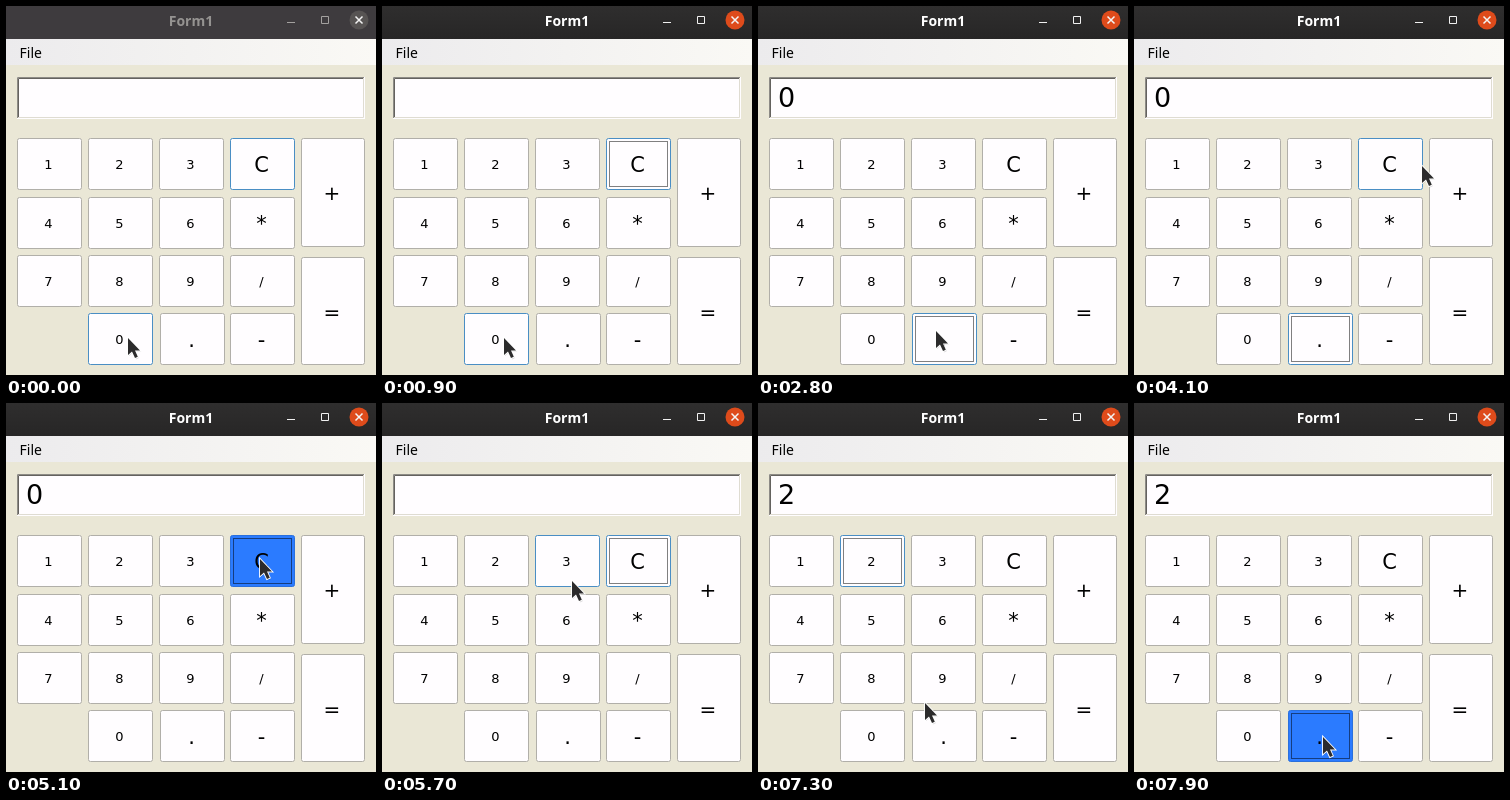
Animation of 370 by 369 pixels, one loop 8000 ms. Source, as an HTML page:

```html
<!DOCTYPE html>
<html lang="en">
<head>
<meta charset="utf-8">
<title>Calculator</title>
<style>
  html, body { margin: 0; width: 100%; height: 100%; overflow: hidden; background: #eae7d6; }
  svg { display: block; width: 370px; height: 369px; }
  text { font-family: "DejaVu Sans", sans-serif; fill: #000; }
  .ui { font: 14px "Noto Sans", sans-serif; }
  .bar { fill: #3e3b3e; }
  .title { font-weight: 700; fill: #959391; text-anchor: middle; }
  .icon { fill: none; stroke: #a3a19f; }
  .close { fill: #575453; }
  .cross { stroke: #f4f4f4; stroke-width: 1.5; }
  .active .bar { fill: url(#dark); }
  .active .title { fill: #fff; }
  .active .icon { stroke: #f0f0f0; }
  .active .close { fill: #de4b1b; }
  .key text { text-anchor: middle; }
  .face { fill: #fffdff; stroke: #b1afa9; }
  .dots { fill: none; stroke: #000; stroke-dasharray: 1 1; visibility: hidden; }
  .focus .face, .hover .face { stroke: #4a8ec4; }
  .press .face { fill: #2b7bff; stroke: #2a70dc; }
  .active .focus .dots { visibility: visible; }
</style>
</head>
<body>
<svg id="stage" viewBox="0 0 370 369">
  <defs>
    <linearGradient id="dark" x2="0" y2="1">
      <stop stop-color="#2f2e2e"/><stop offset="1" stop-color="#272626"/>
    </linearGradient>
    <linearGradient id="menu">
      <stop stop-color="#ecebed"/><stop offset="1" stop-color="#faf9f5"/>
    </linearGradient>
  </defs>
  <rect width="370" height="369" fill="#eae7d6"/>

  <rect class="bar" width="370" height="33"/>
  <text class="ui title" x="185" y="20">Form1</text>
  <path class="icon" d="M281 16.5h8M315.500 10.500h7v7h-7z"/>
  <circle class="close" cx="353" cy="14" r="9.500"/>
  <path class="cross" d="M349.500 10.500l7 7m0-7l-7 7"/>

  <rect y="33" width="370" height="26" fill="url(#menu)"/>
  <text class="ui" x="13.500" y="52">File</text>

  <rect x="11" y="71" width="348" height="42" fill="#fffdff"/>
  <path d="M11.500 112V71.500H358" fill="none" stroke="#8d8b86"/>
  <path d="M12.500 111V72.500H357" fill="none" stroke="#64625f"/>
  <path d="M12 111.500H357.500V72" fill="none" stroke="#dfdcd2"/>
  <text id="display" x="20" y="101" font-size="27"></text>

  <g id="keys"></g>
  <g id="cursor">
    <path d="M0 0V17L4 13.500 7 20.500 10 19 7.200 12.700H12.500Z" transform="translate(1 1)" fill="#000" opacity=".15"/>
    <path d="M0 0V17L4 13.500 7 20 9.800 18.700 7 12.500H12Z" fill="#2c2b2c" stroke="#fff" stroke-width="1.800" paint-order="stroke"/>
  </g>
</svg>
<script>
  const LOOP = 8000;
  const cols = [11, 82, 153, 224];
  const rows = [132, 191, 249, 307];
  const byId = id => document.getElementById(id);

  const layout = [];
  ["123C", "456*", "789/", " 0.-"].forEach((line, r) =>
    [...line].forEach((label, c) => {
      if (label !== " ") layout.push([label, cols[c] + (label === "."), rows[r], 65, 52]);
    }));
  layout.push(["+", 295, 132, 64, 109], ["=", 295, 251, 64, 108]);

  byId("keys").innerHTML = layout.map(([label, x, y, w, h]) => {
    const small = /[\d/]/.test(label);
    const size = small ? 13 : /[+=]/.test(label) ? 20 : 21;
    const baseline = y + h / 2 + (small ? 5 : 7.5);
    const box = (name, inset, rx) => `<rect class="${name}" x="${x + inset}" y="${y + inset}"
      width="${w - 2 * inset}" height="${h - 2 * inset}" rx="${rx}"/>`;
    return `<g class="key">${box("face", 0.5, 2)}${box("dots", 3.5, 0)}
      <text x="${x + w / 2 - 1}" y="${baseline}" font-size="${size}">${label}</text></g>`;
  }).join("");

  const keys = [...byId("keys").children].map((el, i) => [layout[i][0], el]);

  // Each step changes only the listed parts of the state.
  const steps = [
    [0, { active: false, text: "", focus: "C", hover: "0", press: "", at: [122, 332] }],
    [900, { active: true }],
    [1000, { focus: "0", press: "0" }],
    [1100, { press: "", text: "0" }],
    [1800, { at: [151, 329], hover: "" }],
    [1900, { at: [178, 325], hover: "." }],
    [2600, { press: "." }],
    [2800, { press: "", focus: "." }],
    [3900, { at: [206, 302], hover: "" }],
    [4000, { at: [251, 232], hover: "*" }],
    [4100, { at: [288, 160], hover: "C" }],
    [4200, { at: [285, 133] }],
    [4800, { at: [267, 147] }],
    [4900, { at: [254, 156] }],
    [5100, { focus: "C", press: "C" }],
    [5200, { press: "", text: "" }],
    [5600, { at: [222, 165], hover: "" }],
    [5700, { at: [190, 178], hover: "3" }],
    [5800, { at: [174, 186], hover: "" }],
    [6000, { at: [143, 168], hover: "2" }],
    [6100, { at: [119, 151] }],
    [6300, { focus: "" }],
    [6500, { focus: "2" }],
    [6900, { text: "2" }],
    [7000, { at: [139, 216], hover: "" }],
    [7100, { at: [159, 280] }],
    [7300, { at: [167, 300] }],
    [7400, { at: [180, 322], hover: "." }],
    [7500, { at: [189, 334] }],
    [7900, { focus: ".", press: "." }]
  ];

  function draw(time) {
    const state = Object.assign({}, ...steps.filter(s => s[0] <= time).map(s => s[1]));
    byId("stage").classList.toggle("active", state.active);
    byId("display").textContent = state.text;
    byId("cursor").setAttribute("transform", `translate(${state.at})`);
    for (const [label, el] of keys)
      for (const name of ["focus", "hover", "press"])
        el.classList.toggle(name, state[name] === label);
  }

  const start = performance.now();
  function tick() {
    draw((performance.now() - start) % LOOP);
    requestAnimationFrame(tick);
  }
  tick();
</script>
</body>
</html>
```
